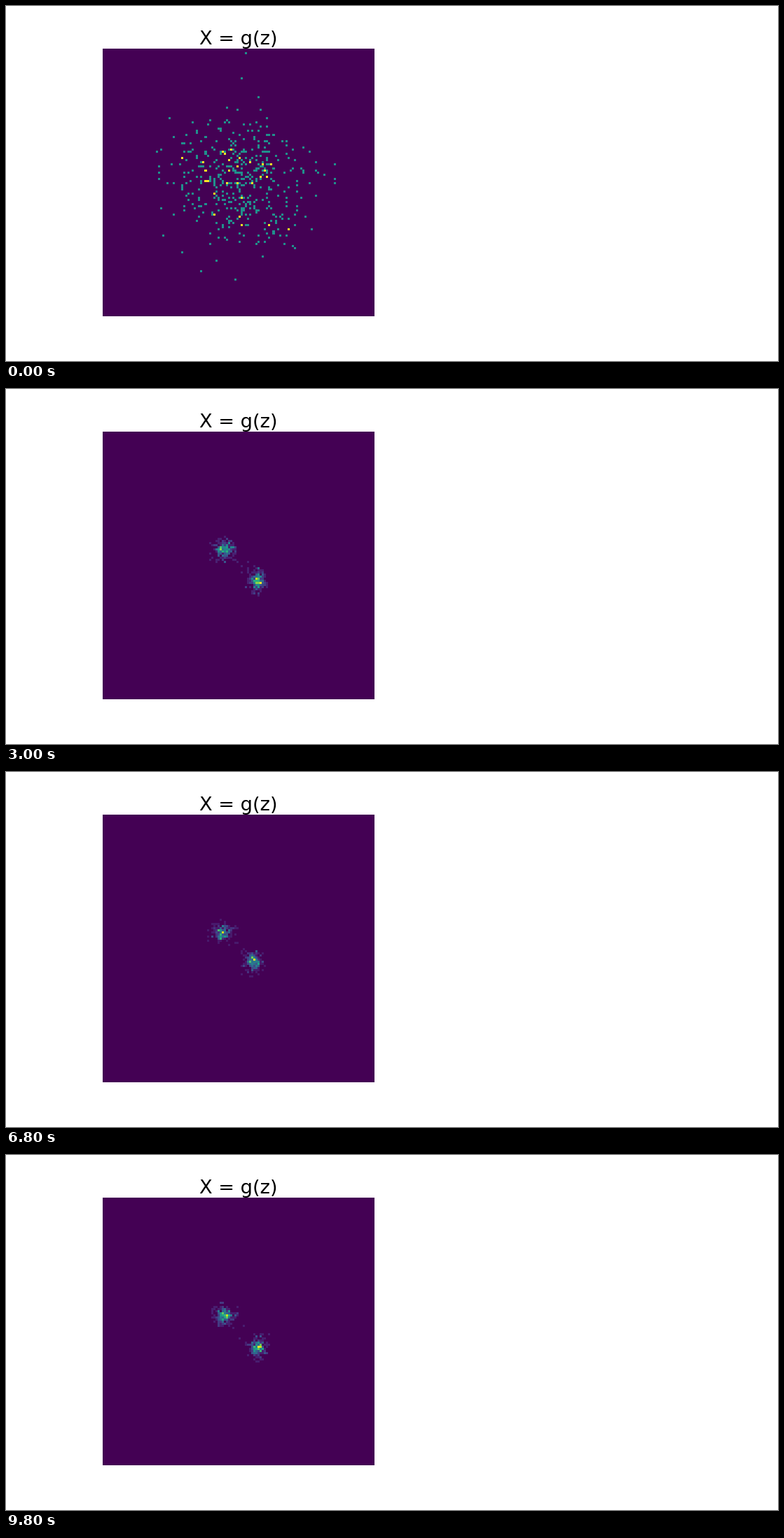
Write a matplotlib script that moves like this. It is 1102 by 508 pixels and loops after 9900 ms.

```python
import matplotlib.pyplot as plt
import numpy as np
from matplotlib.animation import FuncAnimation

WIDTH, HEIGHT, DPI = 1102, 508, 100
LEFT, RIGHT, TOP, BOTTOM = 137.5, 525.0, 61.0, 444.3
BINS, SAMPLES, FRAMES = 128, 450, 99

# Everything below is in stage pixels, y pointing down.
ORIGIN = np.array([331.5, 252.7])
SIGMA = np.array([48.5, 47.9])
UPPER, UPPER_SPREAD = np.array([309.5, 230.0]), np.array([6.6, 5.8])
LOWER, LOWER_SPREAD = np.array([355.5, 274.0]), np.array([5.3, 6.2])


def latent(rng):
    return rng.normal(size=(SAMPLES, 2))


def target_points(rng, z, k):
    """Two drifting clusters; each sample goes to the one on its side."""
    noise = rng.standard_t(5, size=z.shape)
    noise = np.where(np.abs(noise) > 3.3, noise / 3, noise)

    # A few samples stay on the bridge, and now and then one strays.
    mix = (z.sum(axis=1) > 0).astype(float)
    bridge = rng.integers(2, 11)
    mix[:bridge] = rng.uniform(0.2, 0.8, bridge)
    if rng.random() < 0.3:
        noise[-1] *= 3
    mix = mix[:, None]

    swing = np.cos(2 * np.pi * (k - 20) / 80)
    upper = UPPER + swing * np.array([1.5, 0.6])
    lower = LOWER + swing * np.array([3.5, 2.0])
    spread = (1 - mix) * UPPER_SPREAD + mix * LOWER_SPREAD
    return (1 - mix) * upper + mix * lower + noise * spread


def generated(k):
    rng = np.random.default_rng(1000 + k)
    z = latent(rng)
    learned = 1 - np.exp(-(k / 4) ** 1.5)
    return (1 - learned) * (ORIGIN + SIGMA * z) + learned * target_points(rng, z, k)


def density(k):
    x, y = generated(k).T
    counts = np.histogram2d(y, x, BINS, [[TOP, BOTTOM], [LEFT, RIGHT]])[0]
    counts = np.minimum(counts, 2 + k)  # the early cloud is thin everywhere
    return counts / counts.max()


fig = plt.figure(figsize=(WIDTH / DPI, HEIGHT / DPI), dpi=DPI, facecolor="white")
ax = fig.add_axes([LEFT / WIDTH, 1 - BOTTOM / HEIGHT,
                   (RIGHT - LEFT) / WIDTH, (BOTTOM - TOP) / HEIGHT])
ax.axis("off")
ax.set_title("X = g(z)", fontsize=19.6, fontfamily="DejaVu Sans", pad=3.6)
image = ax.imshow(density(0), cmap="viridis", vmin=0, vmax=1,
                  aspect="auto", interpolation="nearest")


def update(k):
    image.set_data(density(k))
    return [image]


anim = FuncAnimation(fig, update, frames=FRAMES, interval=100,
                     repeat=True, repeat_delay=0)
plt.show()
```
